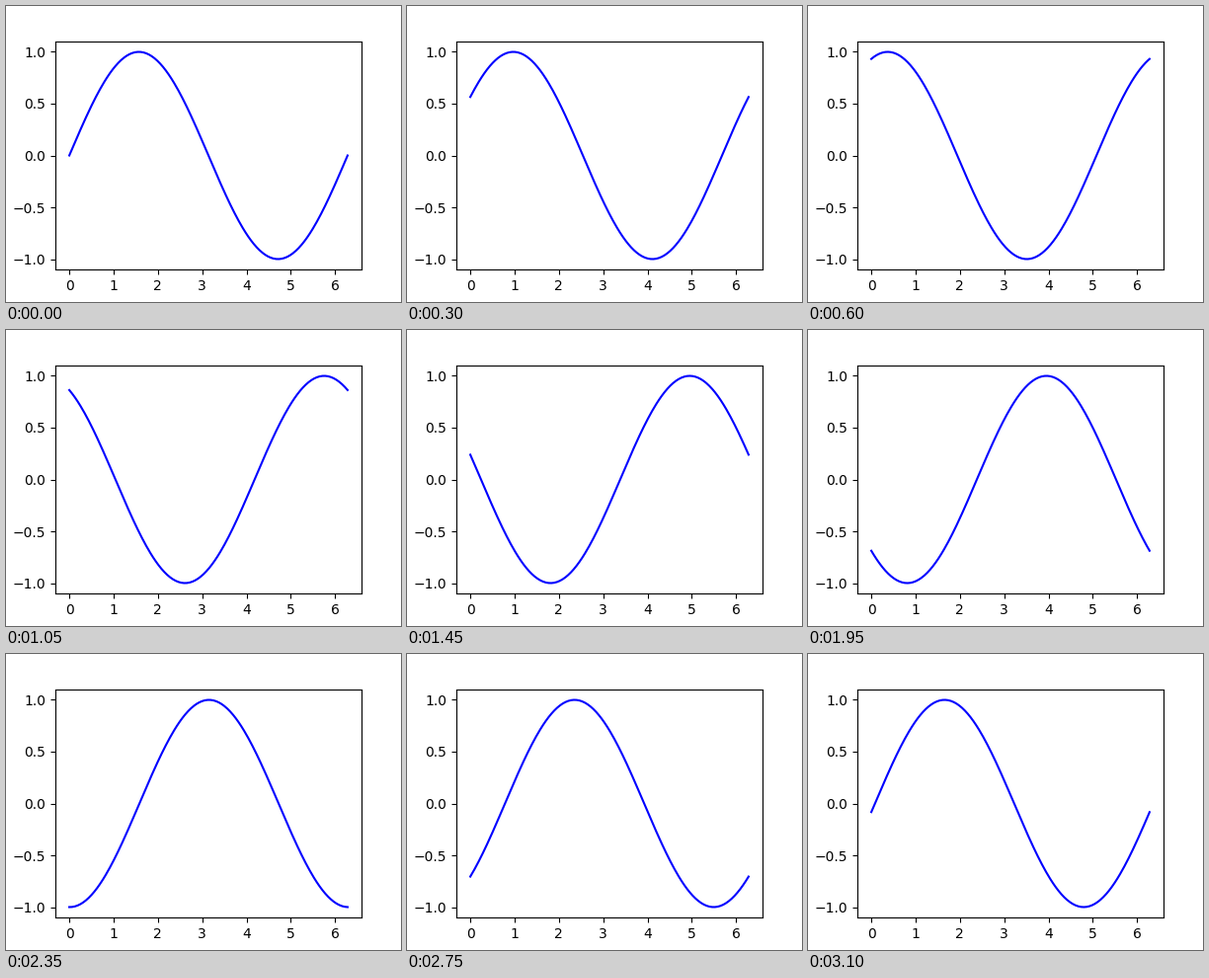
Animation, 400 px wide and 300 px high, one loop 3150 ms. Source, as a matplotlib script:

```python
import numpy as np
import matplotlib.pyplot as plt
from matplotlib.animation import FuncAnimation

FRAMES = 63
INTERVAL = 50
PHASE_STEP = 0.1

fig, ax = plt.subplots(figsize=(4, 3), dpi=100)
x = np.linspace(0, 2 * np.pi, 200)
line, = ax.plot(x, np.sin(x), color="blue", lw=1.5)


def update(i):
    line.set_ydata(np.sin(x + PHASE_STEP * i))
    return line,


anim = FuncAnimation(fig, update, frames=FRAMES, interval=INTERVAL,
                     repeat=True, repeat_delay=0, blit=False)
plt.show()
```
